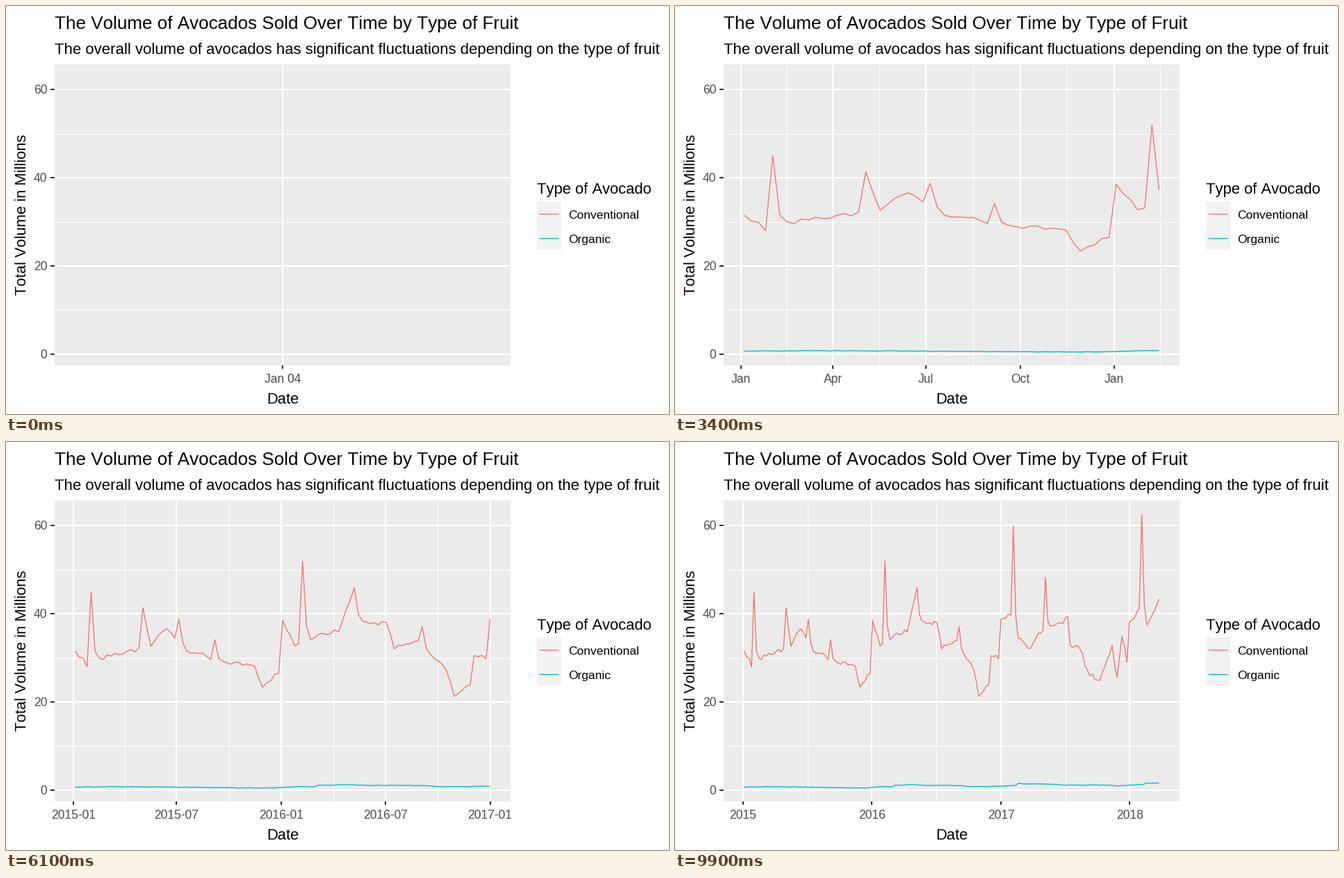
These frames come from a looping animation (954x587 px, 10 s). A matplotlib script:

```python
import numpy as np
import matplotlib as mpl
import matplotlib.pyplot as plt
from matplotlib.animation import FuncAnimation
from matplotlib.patches import Rectangle

W, H, DPI = 954, 587, 64
FRAMES, INTERVAL = 100, 100
LEFT, RIGHT, TOP, BOTTOM = 69.6, 726.4, 84, 516.6
CONV, ORG = "#F8766D", "#00BFC4"
TICK, TICK_TEXT = "#333333", "#4D4D4D"
MAJOR, MINOR, CURVE = 2, 1, 1.4

mpl.rcParams["font.family"] = "Liberation Sans"
mpl.rcParams["text.kerning_factor"] = 20  # no kerning

LAST = 168
weeks = np.arange(LAST + 1)
rng = np.random.default_rng(4)


def trend(knots, noise):
    """Straight runs between (week, millions) knots plus weekly jitter."""
    return np.interp(weeks, *zip(*knots)) + rng.uniform(-noise, noise, LAST + 1)


conv = trend([
    (0, 31), (3, 28.5), (7, 30), (16, 31.7), (18, 36), (19, 32.5), (23, 37),
    (27, 32), (37, 29), (45, 28.5), (47, 22.8), (51, 27), (52, 38), (55, 33),
    (66, 36.3), (69, 42.8), (72, 38), (78, 38), (80, 32.5), (86, 33.8),
    (93, 27.7), (95, 21.3), (99, 23.7), (100, 31), (103, 30), (104, 38.5),
    (108, 40), (111, 34.5), (115, 32), (120, 35.8), (131, 38.8), (132, 32.5),
    (136, 32.5), (139, 26.7), (144, 24.5), (149, 32.5), (151, 25), (153, 35),
    (155, 29.5), (156, 37.5), (160, 41), (163, 37.5), (168, 43)], 0.6)

# Holiday weeks rise above the trend; a little carries into the next week
holidays = {4: 16, 17: 7, 26: 5.5, 35: 4, 57: 18.5, 70: 5, 87: 4,
            109: 22, 122: 11.5, 161: 22.5}
for week, rise in holidays.items():
    conv[week] += rise
    conv[week + 1] += 0.15 * rise

org = trend([
    (0, .65), (8, .78), (20, .75), (38, .53), (50, .52), (56, .77), (60, .77),
    (61, 1.08), (68, 1.27), (72, 1.1), (86, 1.06), (94, .77), (104, .87),
    (110, 1.08), (111, 1.5), (122, 1.35), (131, 1.14), (147, 1.15),
    (151, .95), (162, 1.35), (163, 1.6), (168, 1.6)], 0.06)

# Candidate date breaks, stored as days since the first week
DAY0 = np.datetime64("2015-01-04")
MONTH = 365.25 / 12
months = np.arange("2014-01", "2020-02", dtype="datetime64[M]").astype("datetime64[D]")
mondays = np.arange("2014-12-01", "2019-01-01", 7, dtype="datetime64[D]")


def offsets(dates):
    return (np.sort(dates) - DAY0).astype(int)


STEPS = [
    (7, "%b %d", offsets(mondays)),
    (MONTH / 2, "%b %d", offsets(np.concatenate([months, months + 14]))),
    (MONTH, "%b", offsets(months)),
    (3 * MONTH, "%b", offsets(months[::3])),
    (6 * MONTH, "%Y-%m", offsets(months[::6])),
    (12 * MONTH, "%Y", offsets(months[::12])),
]


def date_breaks(lo, hi, n=5):
    """Pretty date breaks inside lo..hi and their label format."""
    def excess(i):
        at = STEPS[i][2]
        return np.sum(at < hi) - np.sum(at <= lo) + 1 - n

    first = int(np.argmin([abs(s[0] - (hi - lo) / n) for s in STEPS]))
    best, way = first, np.sign(excess(first))
    while way and excess(best) * way > 0 and 0 <= best + way < len(STEPS):
        best += way
    if abs(excess(best)) >= abs(excess(first)):
        best = first
    _, fmt, at = STEPS[best]
    return at[(at >= lo) & (at <= hi)], fmt


def minor_breaks(major, lo, hi):
    if len(major) < 2:
        return []
    gap = major[1] - major[0]
    b = np.concatenate([[major[0] - gap], major, [major[-1] + gap]])
    mid = (b[1:] + b[:-1]) / 2
    return mid[(mid > lo) & (mid < hi)]


def pt(px):
    return px * 72 / DPI


def y_px(v):
    return 500.9 - 6.345 * np.asarray(v)


fig = plt.figure(figsize=(W / DPI, H / DPI), dpi=DPI, facecolor="white")
ax = fig.add_axes([0, 0, 1, 1])
ax.set_xlim(0, W)
ax.set_ylim(H, 0)
ax.axis("off")


def line(x, y, color, width, z):
    return ax.plot(x, y, color=color, lw=pt(width), zorder=z,
                   solid_capstyle="butt", solid_joinstyle="round")[0]


def label(x, y, s, size, color="black", ha="left", **kw):
    return ax.text(x, y, s, fontsize=pt(size), color=color, ha=ha,
                   va="baseline", **kw)


def box(x0, y0, x1, y1, color):
    ax.add_patch(Rectangle((x0, y0), x1 - x0, y1 - y0, fc=color, lw=0, zorder=0))


label(69.5, 33, "The Volume of Avocados Sold Over Time by Type of Fruit", 26)
label(69.5, 69, "The overall volume of avocados has significant fluctuations "
      "depending on the type of fruit", 22.1)
label(398, 572, "Date", 22, ha="center")
label(29.5, 300, "Total Volume in Millions", 22, ha="center",
      rotation=90, rotation_mode="anchor")

box(LEFT, TOP, RIGHT, BOTTOM, "#EBEBEB")
for v in (10, 30, 50):
    line([LEFT, RIGHT], [y_px(v)] * 2, "white", MINOR, 1)
for v in (0, 20, 40, 60):
    line([LEFT, RIGHT], [y_px(v)] * 2, "white", MAJOR, 2)
    line([64, LEFT], [y_px(v)] * 2, TICK, MAJOR, 2)
    label(59.3, y_px(v) + 6.3, str(v), 17.5, TICK_TEXT, "right")

label(764, 270, "Type of Avocado", 22)
box(764, 281, 799, 351, "#F2F2F2")
for y, color, name in ((299, CONV, "Conventional"), (334, ORG, "Organic")):
    line([767, 795], [y, y], color, CURVE, 3)
    label(809.2, y + 7, name, 17.4)

conv_line = line([], [], CONV, CURVE, 4)
org_line = line([], [], ORG, CURVE, 5)
axis_parts = []


def draw(frame):
    while axis_parts:
        axis_parts.pop().remove()

    shown = min(int((frame + 0.5) * LAST / (FRAMES - 1)), LAST)
    days = 7 * shown
    if days:
        lo, hi = -0.05 * days, 1.05 * days
        major, fmt = date_breaks(lo, hi)
    else:
        lo, hi = -0.5, 0.5
        major, fmt = np.array([0]), "%b %d"

    def x_px(d):
        return LEFT + (np.asarray(d) - lo) / (hi - lo) * (RIGHT - LEFT)

    for d in minor_breaks(major, lo, hi):
        axis_parts.append(line([x_px(d)] * 2, [TOP, BOTTOM], "white", MINOR, 1))
    for d in major:
        x = x_px(d)
        text = (DAY0 + int(d)).item().strftime(fmt)
        axis_parts.append(line([x, x], [TOP, BOTTOM], "white", MAJOR, 2))
        axis_parts.append(line([x, x], [BOTTOM, 522.4], TICK, MAJOR, 2))
        axis_parts.append(label(x, 542, text, 17.5, TICK_TEXT, "center"))

    x = x_px(7 * weeks[:shown + 1])
    conv_line.set_data(x, y_px(conv[:shown + 1]))
    org_line.set_data(x, y_px(org[:shown + 1]))
    return [conv_line, org_line, *axis_parts]


anim = FuncAnimation(fig, draw, frames=FRAMES, interval=INTERVAL,
                     repeat=True, repeat_delay=0, blit=False)
plt.show()
```
